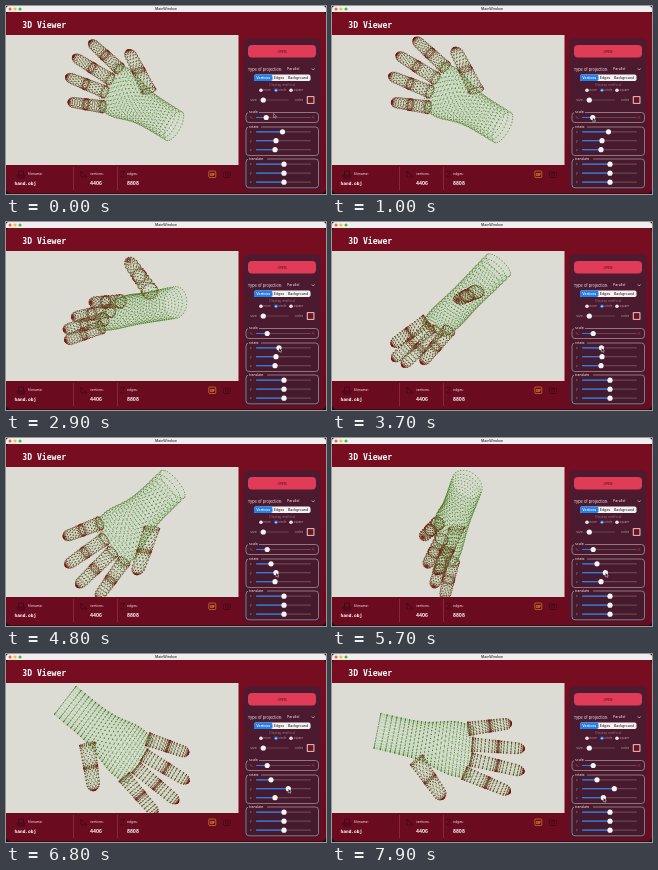
An HTML page with a canvas that plays this animation: 320 px wide and 188 px high, repeating every 8000 ms.

```html
<!DOCTYPE html>
<html lang="en">
<head>
<meta charset="utf-8">
<title>3D Viewer</title>
<style>
html, body { margin: 0; width: 100%; height: 100%; overflow: hidden; background: #1c0b12; }
canvas { display: block; width: 320px; height: 188px; }
</style>
</head>
<body>
<canvas id="stage"></canvas>
<script>
const W = 320, H = 188, LOOP = 8000, STEP = 100, TAU = Math.PI * 2;
const canvas = document.getElementById('stage');
const ctx = canvas.getContext('2d');
const ratio = window.devicePixelRatio || 1;
canvas.width = W * ratio;
canvas.height = H * ratio;

const SANS = 'Inter, "Open Sans", sans-serif';
const MONO = '"DejaVu Sans Mono", monospace';
const INK = '#300a15', PALE = '#f1dfe3', DIM = '#b898a4', BLUE = '#2580ee';

const mix = (a, b, k) => a + (b - a) * k;
const rad = deg => deg * Math.PI / 180;
const progress = (t, from, to, power = 1) =>
  Math.min(1, Math.max(0, (t - from) / (to - from))) ** power;

// How far each slider has been dragged
function dragged(t) {
  return {
    scale: progress(t, 200, 1700),
    x: progress(t, 2100, 4700),
    y: progress(t, 4900, 6800, 1.5),
    z: progress(t, 6950, 7900)
  };
}

// ---- hand model: [along fingers, towards thumb, depth], pivot at 73 along ----

const surfaces = [];
function addSurface(rings, sides, palm, ringAt) {
  const mesh = [];
  for (let i = 0; i <= rings; i++) {
    const ring = [];
    for (let j = 0; j < sides; j++) {
      ring.push(ringAt(i / rings, (j + (i % 2) / 2) / sides * TAU));
    }
    mesh.push(ring);
  }
  surfaces.push({ mesh, palm });
}

function addFinger(base, tip, radius) {
  const axis = tip.map((v, i) => v - base[i]);
  const len = Math.hypot(axis[0], axis[1]);
  addSurface(24, 12, false, (v, a) => {
    // rings crowd together at the joints and the tip
    const u = v - .82 * Math.sin(v * 2 * TAU) / (2 * TAU);
    const cap = Math.max(0, (u - .86) / .14);
    const r = radius * (1 - .2 * u) * Math.sqrt(Math.max(.03, 1 - cap * cap));
    const c = Math.cos(a) * r;
    return [
      base[0] + axis[0] * u - axis[1] / len * c,
      base[1] + axis[1] * u + axis[0] / len * c,
      base[2] + axis[2] * u + Math.sin(a) * r
    ];
  });
}

addSurface(24, 30, true, (v, a) => {
  const u = v ** .85, s = 97 * u, c = Math.cos(a);
  const width = 18 + 9.5 * Math.exp(-(((s - 82) / 27) ** 2));
  return [s + 3 * u * u * c, width * c + 3 * u, Math.sin(a) * (15 - 8 * u * u)];
});
for (let i = 0; i < 4; i++) {
  const arch = (i - 1.8) ** 2;
  addFinger([97 - 2.5 * arch, -20 + 15 * i, 0], [152 - 6.8 * arch, -34 + 23 * i, 0], 6.8);
}
addFinger([44, 20, -7], [78, 49, -31], 8);

// Turn a vector in the plane of axes a and b
function turn(v, a, b, angle) {
  const c = Math.cos(angle), s = Math.sin(angle), out = v.slice();
  out[a] = v[a] * c - v[b] * s;
  out[b] = v[a] * s + v[b] * c;
  return out;
}

function projector(d) {
  const tilt = rad(4.6);
  const spin = v => {
    v = turn(v, 1, 2, rad(10));
    v = turn(v, 0, 1, rad(37.7));
    v = turn(v, 0, 2, rad(-149));
    v = turn(v, 0, 1, tilt);
    v = turn(v, 1, 2, rad(172 * (1 - d.x)));
    v = turn(v, 0, 1, -tilt);
    v = turn(v, 0, 2, rad(149 * d.y));
    return turn(v, 0, 1, rad(-26.5 * d.z));
  };
  const axes = [spin([1, 0, 0]), spin([0, 1, 0]), spin([0, 0, 1])];
  const size = mix(.915, 1, d.scale);
  const place = (p, i) =>
    size * ((p[0] - 73) * axes[0][i] + p[1] * axes[1][i] + p[2] * axes[2][i]);
  return p => [117 + place(p, 0), 91 + place(p, 1)];
}

function drawHand(d) {
  const project = projector(d);
  ctx.save();
  ctx.beginPath();
  ctx.rect(0, 29, 232.5, 130);
  ctx.clip();
  for (const { mesh, palm } of surfaces) {
    const rows = mesh.map(ring => ring.map(project));
    ctx.beginPath();
    rows.forEach((ring, i) => ring.forEach((p, j) => {
      const ends = [ring[(j + 1) % ring.length]];
      if (rows[i + 1]) ends.push(rows[i + 1][j]);
      for (const q of ends) {
        ctx.moveTo(...p);
        ctx.lineTo(...q);
      }
    }));
    ctx.setLineDash([.9, .8]);
    ctx.lineWidth = .55;
    ctx.strokeStyle = palm ? 'rgba(70,200,70,.62)' : 'rgba(70,185,65,.5)';
    ctx.stroke();
    const size = palm ? .75 : .9;
    ctx.fillStyle = palm ? 'rgba(115,45,30,.75)' : 'rgba(125,18,24,.85)';
    for (const [x, y] of rows.flat()) ctx.fillRect(x - size / 2, y - size / 2, size, size);
  }
  ctx.restore();
}

// ---- interface ----

function text(str, x, y, size, color = PALE, font = SANS, weight = 400, align = 'left') {
  ctx.font = `${weight} ${size}px ${font}`;
  ctx.textAlign = align;
  ctx.fillStyle = color;
  ctx.fillText(str, x, y);
}
function box(x, y, w, h, r, fill, line) {
  ctx.beginPath();
  ctx.roundRect(x, y, w, h, r);
  if (fill) { ctx.fillStyle = fill; ctx.fill(); }
  if (line) { ctx.strokeStyle = line; ctx.lineWidth = .6; ctx.stroke(); }
}
function disc(x, y, r, fill) {
  ctx.beginPath();
  ctx.arc(x, y, r, 0, TAU);
  ctx.fillStyle = fill;
  ctx.fill();
}
function polyline(points, color, width = .6) {
  ctx.beginPath();
  points.forEach(p => ctx.lineTo(...p));
  ctx.strokeStyle = color;
  ctx.lineWidth = width;
  ctx.stroke();
}
function fade(y0, y1, from, to) {
  const g = ctx.createLinearGradient(0, y0, 0, y1);
  g.addColorStop(0, from);
  g.addColorStop(1, to);
  return g;
}
function slider(knob, y, label) {
  box(250, y - .6, 55, 1.2, .6, '#6b4552');
  box(250, y - .6, knob - 250, 1.2, .6, BLUE);
  disc(knob, y, 2.6, '#f7f4f5');
  if (label) text(label, 244, y + 1, 3, DIM);
}
function group(label, y, h) {
  box(240, y, 72.5, h, 3, null, '#c9b0b8');
  box(242, y - 2, label.length * 2 + 1, 3.5, 0, '#491a2e');
  text(label, 243, y + .7, 3.5);
}

function drawWindow() {
  ctx.fillStyle = '#1c0b12';
  ctx.fillRect(0, 0, W, H);
  box(0, 5, W, 182.5, 5, fade(5, 187, '#780d20', '#6a0b20'));
  box(0, 0, W, 6, [3, 3, 0, 0], '#f0eeee');
  ['#fb5d55', '#f9bd2e', '#29c640'].forEach((c, i) => disc(4 + i * 5, 2.9, 1.5, c));
  text('MainWindow', 160, 4.2, 3.5, '#444', SANS, 600, 'center');
  text('3D Viewer', 16.3, 22.2, 8.1, '#fff', MONO, 700);
  ctx.fillStyle = '#dcdcd4';
  ctx.fillRect(0, 29, 232.5, 130);
}

function drawFooter() {
  for (const x of [67.5, 111.5]) polyline([[x, 161], [x, 184]], '#a4384e');
  box(12.5, 165, 5, 6, .7, null, INK);
  polyline([[11, 169], [19, 169], [18, 172], [12, 172], [11, 169]], INK);
  polyline([[75, 171], [75, 165], [81, 171], [75, 171]], INK);
  polyline([[114, 165.5], [119, 165.5], [114.5, 171], [119, 171]], INK);

  const label = (str, x) => text(str, x, 168.8, 3.4);
  label('filename:', 22);
  label('vertices:', 84);
  label('edges:', 121);
  text('hand.obj', 8.5, 179.3, 4.5, '#fff', MONO, 700);
  text('4406', 84, 179.3, 4.5, '#fff', SANS, 700);
  text('8808', 121, 179.3, 4.5, '#fff', SANS, 700);

  box(202.8, 165, 7, 6.5, 1, null, '#e9962d');
  text('GIF', 206.3, 169.5, 3.3, '#f0a52f', SANS, 700, 'center');
  box(217.5, 166, 7, 5.5, 1, null, INK);
  ctx.beginPath();
  ctx.arc(221, 168.7, 1.5, 0, TAU);
  ctx.stroke();
}

function drawSettings() {
  box(237.5, 32.5, 77, 152, 5, fade(32, 185, '#4e1a30', '#451a2d'));
  box(242, 39, 68, 12.5, 4, '#e03c58');
  text('OPEN', 276, 46.5, 3.3, '#5c1424', SANS, 500, 'center');
  text('Type of projection:', 241.7, 64.5, 3.9);
  text('Parallel', 281, 64.3, 3.6);
  polyline([[305.7, 62.4], [307.2, 64], [308.7, 62.4]], PALE);

  box(248, 68.6, 56.5, 6.4, 1.8, '#f4f1f2');
  box(248, 68.6, 18.5, 6.4, 1.8, BLUE);
  text('Vertices', 257.2, 73, 3.5, '#fff', SANS, 500, 'center');
  text('Edges', 273, 73, 3.5, '#333', SANS, 500, 'center');
  text('Background', 292, 73, 3.5, '#333', SANS, 500, 'center');
  text('Display method', 276, 79.6, 3.5, '#90707c', SANS, 400, 'center');
  ['none', 'circle', 'square'].forEach((name, i) => {
    const x = 255 + i * 15, on = i === 1;
    disc(x, 84.2, 1.8, on ? BLUE : '#eee6e9');
    if (on) disc(x, 84.2, .7, '#fff');
    text(name, x + 2.6, 85.3, 3, DIM);
  });
  text('size', 244.3, 95, 3.4, DIM);
  box(253, 93.4, 30, 1.2, .6, '#6b4552');
  disc(257.3, 94, 2.6, '#f7f4f5');
  text('color', 289, 95, 3.4, DIM);
  box(300.8, 90.2, 7.6, 7.6, .5, '#f3e5e7');
  box(301.7, 91.1, 5.8, 5.8, 0, '#75101a');
}

function drawSliders(d) {
  const knobs = {
    scale: [mix(260.2, 261.2, d.scale), 111.5],
    x: [mix(276.5, 265, d.x), 125.8],
    y: [mix(270, 282.3, d.y), 134.7],
    z: [mix(269, 271.4, d.z), 143.7]
  };
  group('scale', 106.5, 10);
  slider(...knobs.scale);
  polyline([[244, 110.5], [246, 112.5]], DIM);
  polyline([[306, 110.4], [308, 112.4]], '#dc4055');
  polyline([[308, 110.4], [306, 112.4]], '#dc4055');
  group('rotate', 121, 28.5);
  group('translate', 153, 28.8);
  ['x', 'y', 'z'].forEach((name, i) => {
    slider(...knobs[name], name);
    slider(278, 158.2 + i * 9, name);
  });
  return knobs;
}

// The pointer glides from one knob to the next and rides along with it
function drawCursor(t, knobs) {
  let [x, y] = [267.5, 107.5];
  const visit = ([kx, ky], from, to) => {
    const k = progress(t, from, to);
    x = mix(x, kx, k);
    y = mix(y, ky, k);
  };
  visit(knobs.scale, 200, 600);
  visit(knobs.x, 1800, 2100);
  visit(knobs.y, 4600, 4800);
  visit(knobs.z, 6800, 7000);
  ctx.save();
  ctx.translate(x, y);
  ctx.beginPath();
  [[0, 0], [0, 4.2], [1, 3.3], [1.8, 4.8], [2.5, 4.4], [1.8, 3], [3, 2.9]]
    .forEach(p => ctx.lineTo(...p));
  ctx.closePath();
  ctx.fillStyle = '#181014';
  ctx.fill();
  ctx.strokeStyle = '#fff';
  ctx.lineWidth = .4;
  ctx.stroke();
  ctx.restore();
}

const start = performance.now();
function render() {
  const elapsed = (performance.now() - start) % LOOP;
  const t = Math.floor(elapsed / STEP) * STEP;
  const d = dragged(t);
  ctx.setTransform(ratio, 0, 0, ratio, 0, 0);
  drawWindow();
  drawHand(d);
  drawFooter();
  drawSettings();
  drawCursor(t, drawSliders(d));
  requestAnimationFrame(render);
}
render();
</script>
</body>
</html>
```
